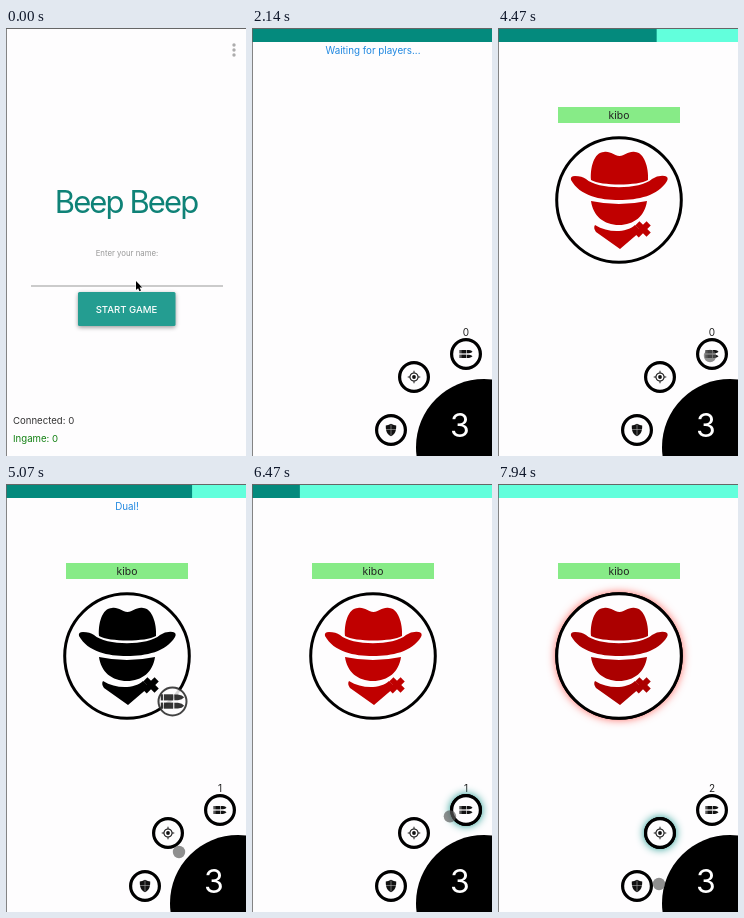
Write an HTML page with a canvas that moves like this. It is 240 px wide and 428 px high and loops after 8 s.

```html
<!DOCTYPE html>
<html lang="en">
<head>
<meta charset="utf-8">
<title>Beep Beep</title>
<style>
  html, body { margin: 0; width: 100%; height: 100%; overflow: hidden; background: #fefdfe; }
  canvas { display: block; width: 240px; height: 428px; }
</style>
</head>
<body>
<canvas id="stage"></canvas>
<script>
const W = 240, H = 428, LOOP = 8000;
const TEAL = '#048a7d', AQUA = '#62ffdc', PAPER = '#fefdfe', RED = [192, 0, 0];
const RIVAL = 'kibo';
const T = { focus: 400, start: 1500, join: 2950, hat: 4120, duel1: 4880, round2: 5700, duel2: 7030, round3: 7850 };

const canvas = document.getElementById('stage');
const ctx = canvas.getContext('2d');
const ratio = window.devicePixelRatio || 1;
canvas.width = W * ratio;
canvas.height = H * ratio;

const clamp = v => Math.max(0, Math.min(1, v));
const ramp = (t, from, length) => clamp((t - from) / length);
const pulse = (t, from, to, fade) => ramp(t, from, fade) * (1 - ramp(t, to, fade));
const ease = u => u * u * (3 - 2 * u);

// Position along [time, x, y] stops, eased between neighbours.
function follow(stops, t) {
  let i = 0;
  while (i < stops.length - 2 && t > stops[i + 1][0]) i++;
  const [t0, x0, y0] = stops[i], [t1, x1, y1] = stops[i + 1];
  const u = ease(ramp(t, t0, t1 - t0));
  return [x0 + (x1 - x0) * u, y0 + (y1 - y0) * u];
}

function rect(x, y, w, h, color) {
  ctx.fillStyle = color;
  ctx.fillRect(x, y, w, h);
}

function disc(x, y, r, color) {
  ctx.fillStyle = color;
  ctx.beginPath();
  ctx.arc(x, y, r, 0, 7);
  ctx.fill();
}

function ring(x, y, r, width, color) {
  ctx.strokeStyle = color;
  ctx.lineWidth = width;
  ctx.beginPath();
  ctx.arc(x, y, r, 0, 7);
  ctx.stroke();
}

function label(text, x, y, size, color, { align = 'center', weight = 400, spacing = 0 } = {}) {
  ctx.font = `${weight} ${size}px Inter, sans-serif`;
  ctx.letterSpacing = spacing + 'px';
  ctx.textAlign = align;
  ctx.fillStyle = color;
  ctx.fillText(text, x, y);
}

function at(x, y, scale, draw) {
  ctx.save();
  ctx.translate(x, y);
  ctx.scale(scale, scale);
  draw();
  ctx.restore();
}

function glowRing(x, y, r, width, glow, color) {
  ctx.save();
  if (glow > 0) {
    ctx.shadowColor = `rgba(${color}, ${glow})`;
    ctx.shadowBlur = 9 * ratio;
    disc(x, y, r + width / 2, '#000');
    ctx.shadowBlur = 0;
  }
  disc(x, y, r, PAPER);
  ring(x, y, r, width, '#000');
  ctx.restore();
}

function bullets() {
  for (const y of [-2.3, 2.3]) {
    rect(-6.5, y - 1.7, 1.2, 3.4, '#111');
    rect(-4.8, y - 1.7, 5.2, 3.4, '#111');
    ctx.beginPath();
    ctx.moveTo(1, y - 1.6);
    ctx.lineTo(3, y - 1.6);
    ctx.quadraticCurveTo(5.5, y - 1.3, 6.5, y);
    ctx.quadraticCurveTo(5.5, y + 1.3, 3, y + 1.6);
    ctx.lineTo(1, y + 1.6);
    ctx.fill();
  }
}

function crosshair() {
  ring(0, 0, 4.3, 1.1, '#111');
  disc(0, 0, 2, '#111');
  for (let i = 0; i < 4; i++) {
    ctx.rotate(Math.PI / 2);
    rect(-0.5, -6.6, 1, 2.6, '#111');
  }
}

const shieldPath = new Path2D('M0 -6.2 Q3 -4.6 5.2 -4.6 C5.4 1 4 4.2 0 6.2 C-4 4.2 -5.4 1 -5.2 -4.6 Q-3 -4.6 0 -6.2Z');
function shield() {
  ctx.fillStyle = '#111';
  ctx.fill(shieldPath);
  rect(-0.3, -5.5, 0.6, 11, '#aaa');
  rect(-5, -0.6, 10, 0.6, '#aaa');
}

const hatParts = [
  'M93 152 C92 140 96 124 106 124 C113 123 116 128 121.5 128 C127 128 130 123 137 124 C146 124 151 140 150 152 C140 158 103 158 93 152Z',
  'M73 152 Q72 148 77 148 Q84 148 88 151 C100 162 142 162 154 151 Q160 147 167 148 Q171 149 169 153 C160 168 140 172 121 172 C102 172 82 168 73 152Z',
  'M93 173 Q121 179 149 173 C147 188 136 197 121 197 C106 197 95 188 93 173Z',
  'M97 197 C110 205 128 205 137 197 L143 203 L122 221 L98 204 Q95 200 97 197Z'
].map(d => new Path2D(d));

function bandit(color) {
  ctx.fillStyle = color;
  hatParts.forEach(part => ctx.fill(part));
  ctx.save();
  ctx.translate(145, 201);
  ctx.rotate(-Math.PI / 4);
  rect(-9, -3, 17, 6, color);
  rect(-3, -8, 6, 16, color);
  ctx.restore();
}

const arrowPath = new Path2D('M0 0 L0 9 L2.1 7.2 L3.5 10.3 L5 9.6 L3.6 6.6 L6.3 6.4Z');
const arrowStops = [[0, 130, 253], [70, 130, 253], [350, 127, 245], [650, 127, 245], [1150, 125, 277], [1500, 125, 277]];
const touchStops = [
  [2700, 120, 240], [3300, 138, 219], [3950, 138, 219], [4400, 212, 328], [4650, 212, 328],
  [5070, 173, 368], [5350, 173, 368], [5900, 203, 331], [6300, 206, 329],
  [6900, 165, 346], [7250, 165, 346], [7720, 143, 402], [7940, 161, 400], [8000, 164, 400]
];

function welcome(t) {
  const focused = t > T.focus;
  for (const y of [17, 22, 27]) disc(228, y, 1.7, '#adadad');
  label('Beep Beep', 120, 185, 31, '#0f8277', { spacing: -1.9 });
  label('Enter your name:', 121, 228, 7.8, '#999');
  rect(25, 257.5, 192, 1, focused ? '#26a69a' : '#999');
  if (focused && (t - T.focus) % 1000 < 500) rect(25.5, 241, 0.8, 12, '#333');

  ctx.save();
  ctx.shadowColor = 'rgba(0,0,0,.4)';
  ctx.shadowBlur = 4 * ratio;
  ctx.shadowOffsetY = 1.5 * ratio;
  ctx.fillStyle = '#249d91';
  ctx.beginPath();
  ctx.roundRect(72, 264, 97.5, 34, 1.5);
  ctx.fill();
  ctx.restore();
  label('START GAME', 120.5, 285, 9.6, '#fff', { weight: 500 });

  label('Connected: 0', 7, 396, 9.6, '#333', { align: 'left' });
  label('Ingame: 0', 7, 414, 9.6, '#128012', { align: 'left' });

  const [x, y] = follow(arrowStops, t);
  ctx.save();
  ctx.translate(x, y);
  ctx.strokeStyle = '#fff';
  ctx.lineWidth = 1;
  ctx.stroke(arrowPath);
  ctx.fillStyle = '#000';
  ctx.fill(arrowPath);
  ctx.restore();
}

function barWidth(t) {
  if (t < T.join) return W;
  if (t < T.round2) return 128 + (t - 3800) * 0.0457;
  if (t < T.round3) return 22 + (t - 5940) * 0.0487;
  return 0;
}

function status(t) {
  if (t < T.join) return 'Waiting for players...';
  if (t < T.hat) return RIVAL + ' has joined the game.';
  const dueling = (t >= T.duel1 && t < T.round2) || (t >= T.duel2 && t < T.round3);
  return dueling ? 'Dual!' : '';
}

function hatColor(t) {
  const fade = 110;
  let k = 1 - ramp(t, T.duel1, fade);
  if (t >= T.round2) k = ramp(t, T.round2, fade) * (1 - ramp(t, T.duel2 - 70, fade));
  if (t >= T.round3) k = 0.89 * ramp(t, T.round3, 90);
  return `rgb(${RED.map(c => Math.round(c * k))})`;
}

function rival(t) {
  rect(60, 79, 122, 16, '#87eb87');
  label(RIVAL, 121, 91, 10.4, '#222');
  glowRing(121, 172, 62.3, 3, 0.75 * ramp(t, T.duel2 - 60, 100), '255, 60, 50');
  if (t < T.hat) return;
  bandit(hatColor(t));

  const shown = pulse(t, T.duel1, 5360, 180) + pulse(t, T.duel2, 7560, 220);
  if (!shown) return;
  ctx.save();
  ctx.globalAlpha = 0.85 * shown;
  disc(166.5, 217.5, 14, PAPER);
  ring(166.5, 217.5, 14, 2, '#222');
  at(166.5, 217.5, 1.8, bullets);
  ctx.restore();
}

function controls(t) {
  const aqua = '20, 150, 140';
  const reload = pulse(t, 4520, 4850, 80) + pulse(t, 6150, 6820, 80);
  const ammo = t < T.duel1 ? 0 : t < T.duel2 ? 1 : 2;
  label(ammo, 214, 307.5, 10, '#222');
  glowRing(214, 326, 14.4, 3.2, reload, aqua);
  at(214, 326, 1, bullets);
  glowRing(162, 349, 14.4, 3.2, ramp(t, 7300, 100), aqua);
  at(162, 349, 0.95, crosshair);
  glowRing(139, 402, 14.4, 3.2, 0, aqua);
  at(139, 402, 1, shield);
  disc(232, 419, 68, '#000');
  label('3', 208, 409, 32, '#fff');
}

function game(t) {
  rect(0, 1, W, 13, AQUA);
  rect(0, 1, barWidth(t), 13, TEAL);
  label(status(t), 121, 26, 9.8, '#1f87e0');
  if (t >= T.join) rival(t);
  controls(t);
  if (t >= 2700) {
    const [x, y] = follow(touchStops, t);
    disc(x, y, 6.2, 'rgba(90,90,90,.68)');
  }
}

function frame(now) {
  const t = now % LOOP;
  ctx.setTransform(ratio, 0, 0, ratio, 0, 0);
  rect(0, 0, W, H, PAPER);
  t < T.start ? welcome(t) : game(t);
  rect(0, 0, W, 1, '#666');
  rect(0, 0, 0.8, H, '#666');
  requestAnimationFrame(frame);
}
requestAnimationFrame(frame);
</script>
</body>
</html>
```
